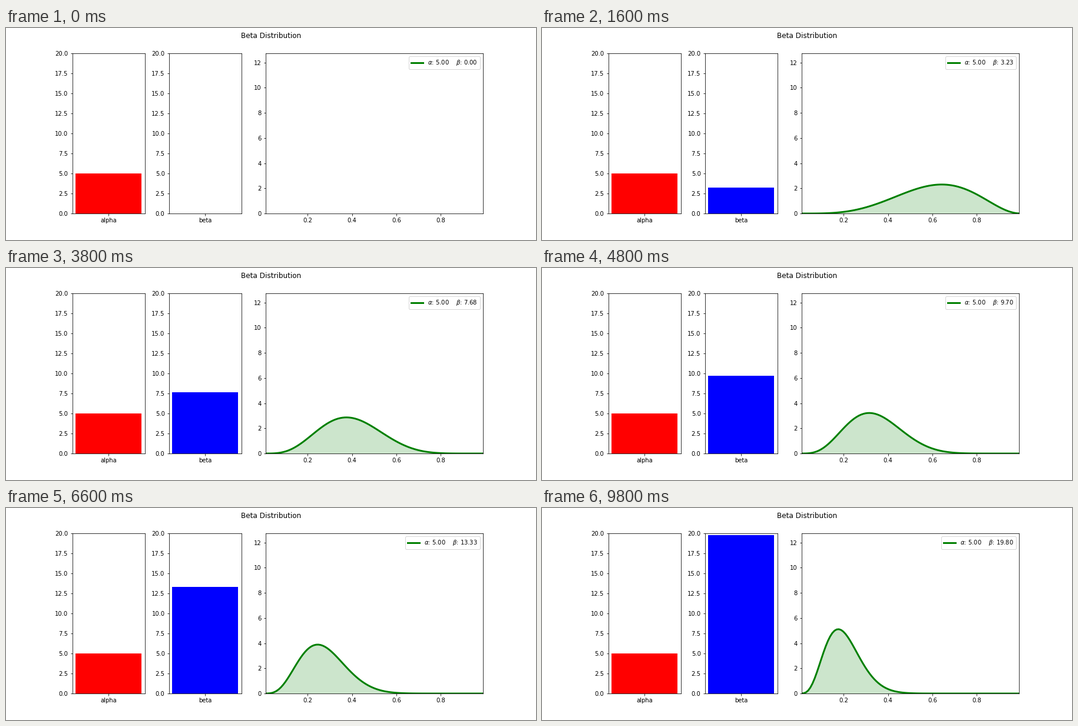
These frames come from a looping animation (900 px wide and 360 px high, 10000 ms). A matplotlib script:

```python
import math

import numpy as np
import matplotlib.pyplot as plt
from matplotlib.animation import FuncAnimation

plt.rcParams["font.family"] = "DejaVu Sans"
plt.rcParams["font.size"] = 10

FRAMES = 50
INTERVAL = 200
ALPHA = 5.0
BETA_STEP = 40 / 99
X = np.linspace(0.01, 0.99, 100)


def beta_pdf(a, b):
    scale = math.gamma(a + b) / (math.gamma(a) * math.gamma(b))
    return scale * X ** (a - 1) * (1 - X) ** (b - 1)


def draw_bar(ax, name, height, color):
    bar = ax.bar([name], [height], color=color)[0]
    ax.set_ylim(0, 20)
    ax.set_yticks(np.arange(0, 20.1, 2.5))
    return bar


def caption(b):
    return rf"$\alpha$: {ALPHA:.2f}    $\beta$: {b:.2f}"


fig = plt.figure(figsize=(12.5, 5), dpi=72, facecolor="white")
grid = fig.add_gridspec(1, 3, width_ratios=[1, 1, 3], wspace=0.2,
                        left=0.125, right=0.9, bottom=0.125, top=0.88)
ax_alpha, ax_beta, ax_pdf = [fig.add_subplot(cell) for cell in grid]
fig.suptitle("Beta Distribution", fontsize=12)

draw_bar(ax_alpha, "alpha", ALPHA, "red")
beta_bar = draw_bar(ax_beta, "beta", 0, "blue")

curve, = ax_pdf.plot([], [], color="green", lw=3, label=caption(0))
area = ax_pdf.fill_between(X, 0 * X, color="green", alpha=0.2, lw=0)
ax_pdf.set_xlim(X[0], X[-1])
ax_pdf.set_ylim(0, beta_pdf(ALPHA, BETA_STEP).max())
ax_pdf.set_xticks([0.2, 0.4, 0.6, 0.8])
ax_pdf.set_yticks(range(0, 13, 2))
legend_text = ax_pdf.legend(loc="upper right").get_texts()[0]


def update(i):
    b = i * BETA_STEP
    beta_bar.set_height(b)
    legend_text.set_text(caption(b))
    if i == 0:
        # the density is undefined at beta = 0
        curve.set_data([], [])
        area.set_verts([])
    else:
        y = beta_pdf(ALPHA, b)
        curve.set_data(X, y)
        outline = np.column_stack([X, y])
        area.set_verts([np.vstack([[X[0], 0], outline, [X[-1], 0]])])
    return beta_bar, curve, area, legend_text


anim = FuncAnimation(fig, update, frames=FRAMES, init_func=lambda: update(0),
                     interval=INTERVAL, repeat=True, repeat_delay=0, blit=False)
plt.show()
```
